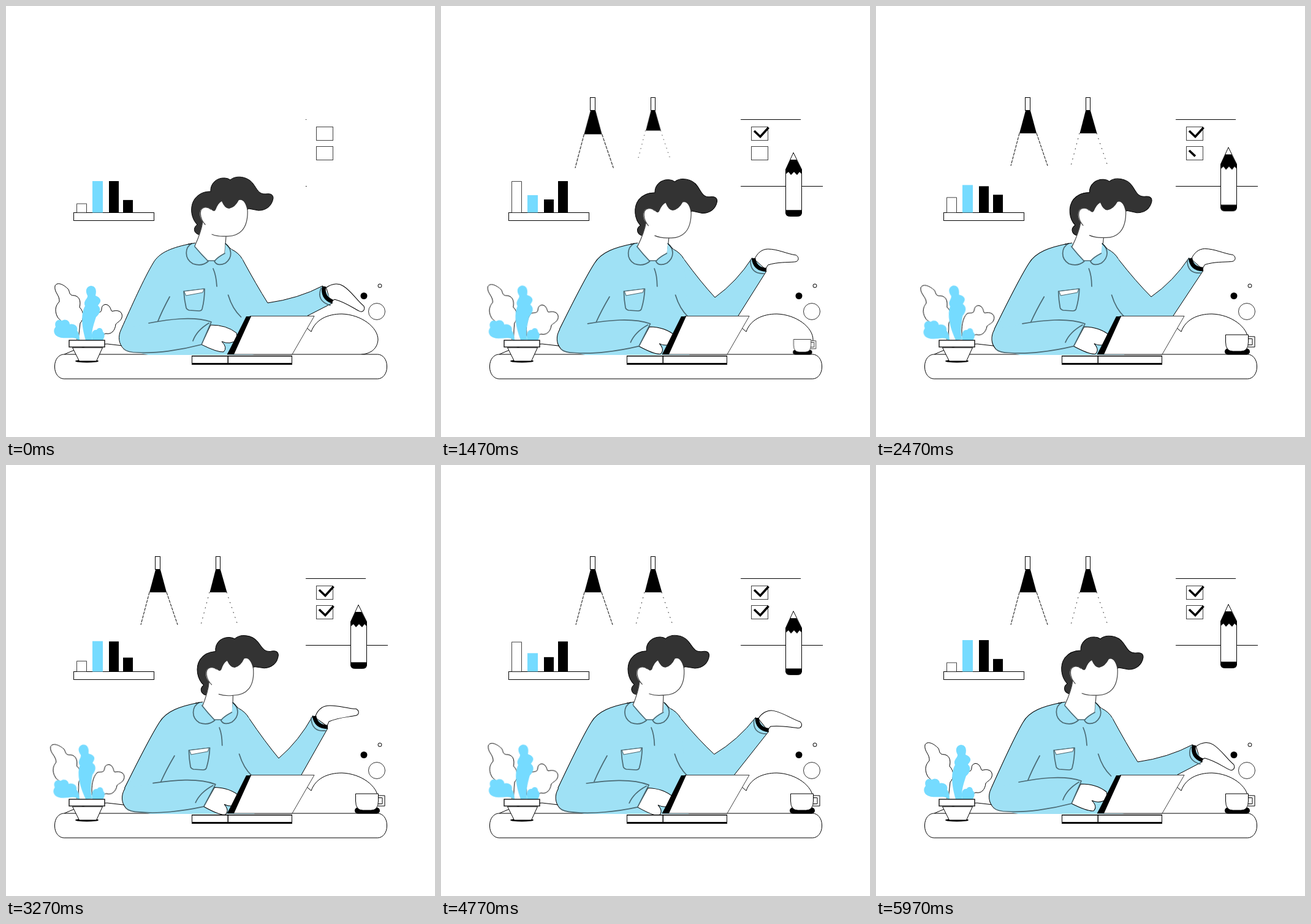
An HTML page for the animation above (6010 ms loop, 700 px wide and 704 px high).

```html
<!DOCTYPE html>
<html lang="en">
<head>
<meta charset="utf-8">
<title>At the desk</title>
<style>
html, body { margin: 0; width: 100%; height: 100%; overflow: hidden; background: #fff; }
svg { display: block; width: 100vw; height: 100vh; }
.o { fill: #fff; stroke: #000; }
.l { fill: none; stroke: #000; }
.soft { fill: none; stroke: #4b6a74; stroke-width: 1.7; stroke-linecap: round; stroke-linejoin: round; }
.shirt { fill: #9fe1f5; }
.sky { fill: #75dbff; }
.tick { fill: none; stroke: #000; stroke-width: 3.6; stroke-dasharray: 1 2; }

.bar { transform-origin: 0 337.5px; animation: grow 1502.5ms cubic-bezier(.37,0,.63,1) infinite alternate; }
.bar.o { vector-effect: non-scaling-stroke; }
@keyframes grow { from { transform: scaleY(var(--a)); } to { transform: scaleY(var(--b)); } }

.leaf { animation: sway 3005ms cubic-bezier(.37,0,.63,1) infinite alternate; }
@keyframes sway { to { transform: rotate(var(--r)); } }

.bob { animation: bob 1502.5ms cubic-bezier(.37,0,.63,1) infinite alternate; }
@keyframes bob { from { transform: translateY(0); } to { transform: translateY(12px); } }

.intro { animation: 6010ms linear infinite; }
#rod1, #rod2 { transform-origin: 0 149px; animation-name: rod; }
#lamp1 { transform-origin: 247.5px 171px; animation-name: lamp1; }
#lamp2 { transform-origin: 346px 171px; animation-name: lamp2; }
#pencil { transform-origin: 575px 280px; animation-name: pencil; }
#cup { transform-origin: 591px 569px; animation-name: cup; }
#rule1, #rule2 { stroke-dasharray: 1 2; animation-name: rule; }
#tick1 { animation-name: tick1; }
#tick2 { animation-name: tick2; }
@keyframes rod { 0%, 3% { transform: scaleY(0); } 10%, 100% { transform: scaleY(1); } }
@keyframes lamp1 { 0%, 15% { transform: scale(0); } 22% { transform: scale(1.08); } 27%, 100% { transform: scale(1); } }
@keyframes lamp2 { 0%, 19% { transform: scale(0); } 24.5% { transform: scale(.88); } 27% { transform: scale(1.06); } 32%, 100% { transform: scale(1); } }
@keyframes pencil { 0%, 7% { transform: scale(0); } 14% { transform: scale(1.06); } 18%, 100% { transform: scale(1); } }
@keyframes cup { 0%, 20% { transform: scale(0); } 24.5% { transform: scale(.77); } 28% { transform: scale(1.06); } 32%, 100% { transform: scale(1); } }
@keyframes rule { 0% { stroke-dashoffset: .99; } 12%, 100% { stroke-dashoffset: 0; } }
@keyframes tick1 { 0%, 13% { stroke-dashoffset: 1.02; } 20%, 100% { stroke-dashoffset: 0; } }
@keyframes tick2 { 0%, 38.5% { stroke-dashoffset: 1.02; } 41.1% { stroke-dashoffset: .6; } 46%, 100% { stroke-dashoffset: 0; } }
</style>
</head>
<body>
<svg viewBox="0 0 700 704">
  <!-- lamps -->
  <g id="rod1" class="intro"><rect class="o" x="243.5" y="149.5" width="8" height="21"/></g>
  <g id="rod2" class="intro"><rect class="o" x="342.5" y="149.5" width="7" height="21"/></g>
  <g id="lamp1" class="intro">
    <path d="M244 171h8l10 37h-28z"/>
    <path class="l" stroke-dasharray="5 1.5" d="M234 208l-14 53M262 208l18 53"/>
  </g>
  <g id="lamp2" class="intro">
    <path d="M342 171h8l10.500 37h-28z"/>
    <path class="l" stroke-dasharray="1.500 7" d="M332 208l-14 53M360 208l18 53"/>
  </g>

  <!-- checklist -->
  <path id="rule1" class="l intro" pathLength="1" d="M489 185.500H587"/>
  <path id="rule2" class="l intro" pathLength="1" d="M489 294.500H623"/>
  <g class="o" stroke-opacity=".75">
    <rect x="506.500" y="197.500" width="27" height="22"/>
    <rect x="506.500" y="229.500" width="27" height="22"/>
  </g>
  <path id="tick1" class="tick intro" pathLength="1" d="M511 204l10 9.500l13.500-15"/>
  <path id="tick2" class="tick intro" pathLength="1" d="M511 236l10 9.500l13.500-15"/>
  <g id="pencil" class="intro"><g class="bob">
    <path class="o" d="M562.500 255L575 227.500L588.500 255V322H562.500z"/>
    <path d="M570 239h10l9 17v7l-4-4l-4 5l-5-5l-5 5l-4-5l-5 4v-7z"/>
    <path d="M562 321.500h27v5q-1 5.500-8 5.500h-11q-7 0-8-5.500z"/>
  </g></g>

  <!-- shelf chart -->
  <rect class="o" x="110.500" y="337.500" width="131" height="13"/>
  <rect class="bar o" x="115.500" y="286.500" width="16" height="51" stroke-opacity=".75" style="--a:.284;--b:1"/>
  <rect class="bar sky" x="141" y="286" width="17" height="51.500" style="--a:1;--b:.553"/>
  <rect class="bar" x="168" y="286" width="16" height="51.500" style="--a:1;--b:.417"/>
  <rect class="bar" x="191" y="286" width="16" height="51.500" style="--a:.4;--b:1"/>

  <!-- desk -->
  <path class="l" d="M95 569Q130 552 165 552L200 556"/>
  <path class="o" d="M491 526L498 532C505 512 525 503 548 503C580 504 607 525 607 545C606 560 595 568 580 569"/>
  <rect class="o" x="79.500" y="569" width="542" height="40" rx="15" ry="19"/>
  <circle class="o" cx="605" cy="499" r="13.500" stroke-opacity=".8"/>
  <circle cx="584" cy="473.500" r="5.500"/>
  <circle class="o" cx="610" cy="457" r="3"/>
  <g id="cup" class="intro">
    <rect x="569" y="559.500" width="41" height="10" rx="5"/>
    <path class="o" d="M607 540h11v17h-11M607 543.500h7v10h-7"/>
    <path class="o" d="M570.500 537h37v12q0 15-12 15h-13q-12 0-12-15z"/>
  </g>

  <!-- plant -->
  <path class="leaf o" style="--r:-5deg;transform-origin:115px 545px" d="M116 545C112 522 92 520 84 508C78 496 82 488 87 483C88 472 78 468 80 457C84 450 94 455 101 462C105 466 101 473 112 473C121 475 122 484 120 492C128 500 127 512 121 518L118 545"/>
  <path class="leaf o" style="--r:5.500deg;transform-origin:145px 545px" d="M140 540C137 525 138 510 145 502C150 500 156 502 156 495C156 488 163 485 168 490C173 496 170 500 176 498C186 496 191 502 189 509C187 515 182 516 179 520C178 530 172 537 163 535C158 536 156 540 150 545"/>
  <path class="leaf sky" style="--r:-9deg;transform-origin:130px 545px" d="M130 546C122 520 123 500 129 490C125 482 134 478 133 473C127 462 135 457 139 457C147 458 148 465 146 473C155 477 157 482 150 489C158 497 150 505 147 508C143 520 138 535 141 546Z"/>
  <path class="leaf sky" style="--r:-4deg;transform-origin:117px 545px" d="M118 546C112 538 98 545 87 541C78 538 76 530 81 524C78 517 84 510 91 514C97 510 104 514 104 520C112 518 118 524 116 530C120 536 120 542 120 546Z"/>
  <path class="leaf sky" style="--r:3deg;transform-origin:145px 545px" d="M141 546C138 534 142 528 148 529C150 524 158 525 158 532C163 536 160 542 158 546Z"/>
  <ellipse cx="132" cy="580" rx="19" ry="2.500"/>
  <path class="o" d="M108.500 558h49l-10 22h-28z"/>
  <rect class="o" x="103" y="546" width="58" height="11" stroke-width="1.300"/>

  <!-- raised arm -->
  <path id="hand" class="o" d="M-8-8C-4-18 4-25 14-25C30-25 45-17 60-15C66-11 64-4 57-4C45-3 30-4 14 1L10 8Z"/>
  <path id="sleeve" class="shirt"/>
  <path id="sleeveLine" class="l"/>
  <path id="cuff" class="l" stroke-width="6.500"/>
  <path id="cuffLine" class="soft"/>

  <!-- torso -->
  <g class="lean">
    <path class="shirt" d="M303 388C272 394 250 402 240 420C225 445 205 490 188 528L200 562L232 570H402L386 414L367 397L358 388Z"/>
    <path class="l" d="M303 388C272 394 250 402 240 420C225 445 205 490 188 528"/>
    <path fill="#fff" d="M308 393L327 416H340L357 404L359 388H312Z"/>
    <path class="soft" d="M327 416H341M338 429Q343 440 344 458M267 475Q255 497 247 517"/>
    <path class="soft" d="M290 466L324 462Q324 480 320 495Q319 498 315 498L299 497Q295 496 294 493Q291 480 290 466"/>
    <path class="soft" style="fill:#fff;stroke-width:1" d="M291 466L323 462L321 468L294 473Z"/>
  </g>
  <path id="crease" class="soft"/>

  <!-- head -->
  <g id="head">
    <path fill="#333" stroke="#000" d="M319 374C308 374 303 364 312 357C302 347 299 328 308 315C316 305 325 303 334 303C333 290 344 280 357 281Q362 281 366 284C375 276 394 278 403 290C410 299 412 308 424 307C432 306 436 308 436 314C434 327 424 334 412 334L396 331L340 360Z"/>
    <path fill="#fff" d="M333 330Q339 338 342 333Q346 322 352 319Q357 331 364 331Q374 329 380 317Q390 314 394 335C395 365 380 377 359 376L358 403L340 413L327 411L308 392Q318 370 321 352C315 345 314 330 324 329Q330 328 335 333Z"/>
    <path class="soft" style="stroke:#444;stroke-width:1.200" d="M394 331C396 365 380 377 359 376Q346 377 336 373M359 376L357 403M308 392Q319 368 321 352M325 357C316 347 314 331 324 329Q330 328 334 332"/>
  </g>

  <g class="lean">
    <path class="shirt" d="M303 388C292 394 290 412 305 421Q320 426 330 417Q318 405 308 393ZM357 404Q344 411 340 417Q345 426 358 420C371 410 368 396 358 388Z"/>
    <path class="soft" d="M303 388C292 394 290 412 305 421Q320 426 330 417Q318 405 308 393M357 404Q344 411 340 417Q345 426 358 420C371 410 368 396 358 388"/>
    <path class="l" d="M297 389L309 387M358 388L367 397"/>
    <g id="forearm">
      <path class="o" d="M334 521Q360 521 376 534L378 545Q365 554 352 548Q362 558 355 565Q345 566 319 553Z"/>
      <path class="shirt" d="M233 518C265 512 305 506 335 516L319 553C285 562 245 568 215 566C186 566 180 545 188 528Z"/>
      <path class="l" d="M188 528C182 540 184 552 192 560"/>
      <path class="soft" d="M233 518C265 512 305 506 335 516L319 553C285 562 245 568 215 566Q198 566 192 560M331 518Q311 530 305 547"/>
    </g>
  </g>

  <!-- laptop -->
  <path class="o" stroke-opacity=".75" d="M398 506.500H503L467 569H361Z"/>
  <path d="M392 507H400L372 569H361Z"/>
  <rect class="o" x="303.500" y="571.500" width="163" height="14"/>
  <path d="M303 583h164v3h-164zM303 571h164v1.500h-164zM361.500 571h1.500v14h-1.500z"/>
</svg>
<script>
const LOOP = 6010;
const TIMES = [0, 1470, 2470, 3270, 4130, 5430, LOOP];
// One row per part, one value per time; the last value repeats the first.
const POSES = {
  lean:  [0, 12, 11, 12, 6, 6],
  headX: [0, 14, 13.5, 9.5, .5, 4.5],
  headY: [0, 3, 2.5, 0, -1, .5],
  tilt:  [0, 1.7, 1.6, -2.7, -2.7, -.9],
  fore:  [0, 1.2, 1.2, 2.2, 4.5, .3],
  ex:    [427, 447, 449, 445, 451, 436],
  ey:    [485, 476, 475, 479, 467, 481],
  cx:    [517, 508, 511, 501, 521, 506],
  cy:    [457, 411, 411, 409, 406, 426],
  bx:    [533, 531, 534, 525, 543, 526],
  by:    [485, 433, 432, 430, 430, 448],
  ux:    [492, 485, 485, 482, 480, 478],
  turn:  [32, 0, 0, -6, 12, 8]
};

// Smooth curve through periodic keys, without overshoot.
function curve(keys) {
  const n = keys.length, v = [...keys, keys[0]];
  const slope = i => (v[i + 1] - v[i]) / (TIMES[i + 1] - TIMES[i]);
  const tangent = i => {
    const a = slope((i + n - 1) % n), b = slope(i % n);
    return a * b > 0 ? 2 * a * b / (a + b) : 0;
  };
  return t => {
    let i = 0;
    while (i < n - 1 && t >= TIMES[i + 1]) i++;
    const h = TIMES[i + 1] - TIMES[i], u = (t - TIMES[i]) / h, w = 1 - u;
    return v[i] * w * w * (1 + 2 * u) + v[i + 1] * u * u * (3 - 2 * u)
      + h * u * w * (tangent(i) * w - tangent(i + 1) * u);
  };
}

const curves = Object.entries(POSES).map(([name, keys]) => [name, curve(keys)]);
const el = id => document.getElementById(id);
const set = (id, name, value) => el(id).setAttribute(name, value);
const leaning = document.querySelectorAll('.lean');

function draw(t) {
  const p = Object.fromEntries(curves.map(([name, at]) => [name, at(t)]));
  const { lean, ex, ey, cx, cy, bx, by } = p;

  for (const g of leaning)
    g.setAttribute('transform', `matrix(1 0 ${-.004 * lean} 1 ${2.56 * lean} 0)`);
  set('head', 'transform', `translate(${p.headX} ${p.headY}) rotate(${p.tilt} 365 335)`);
  set('forearm', 'transform', `rotate(${p.fore} 190 550)`);

  const wx = (cx + bx) / 2, wy = (cy + by) / 2;
  set('hand', 'transform', `translate(${wx} ${wy}) rotate(${p.turn})`);

  const sx = 386 + .9 * lean, nx = 367 + .97 * lean;
  const top = `M${nx} 397Q${sx - 6} 403 ${sx} 414`
    + `Q${(sx + ex) / 2 + 2} ${(414 + ey) / 2 + 6} ${ex} ${ey}`
    + `Q${(ex + cx) / 2 + 5} ${(ey + cy) / 2 + 7} ${cx} ${cy}`;
  const dx = bx - cx, dy = by - cy, len = Math.hypot(dx, dy);
  const band = k => `Q${wx - dy / len * k} ${wy + dx / len * k} `;
  set('sleeve', 'd', `${top}L${bx} ${by}L${p.ux} 506L465 550L402 570H340L${sx - 40} 420Z`);
  set('sleeveLine', 'd', `${top}M${bx} ${by}L${p.ux} 506`);
  set('cuff', 'd', `M${cx + 2} ${cy + 1}${band(11)}${bx} ${by - 2}`);
  set('cuffLine', 'd', `M${cx - 3} ${cy + 4}${band(22)}${bx - 4} ${by + 4}`);
  set('crease', 'd', `M${ex - 64.5} 472q7 23 21 36`);
}

let start;
function tick(now) {
  start ??= now;
  draw((now - start) % LOOP);
  requestAnimationFrame(tick);
}
draw(0);
requestAnimationFrame(tick);
</script>
</body>
</html>
```
